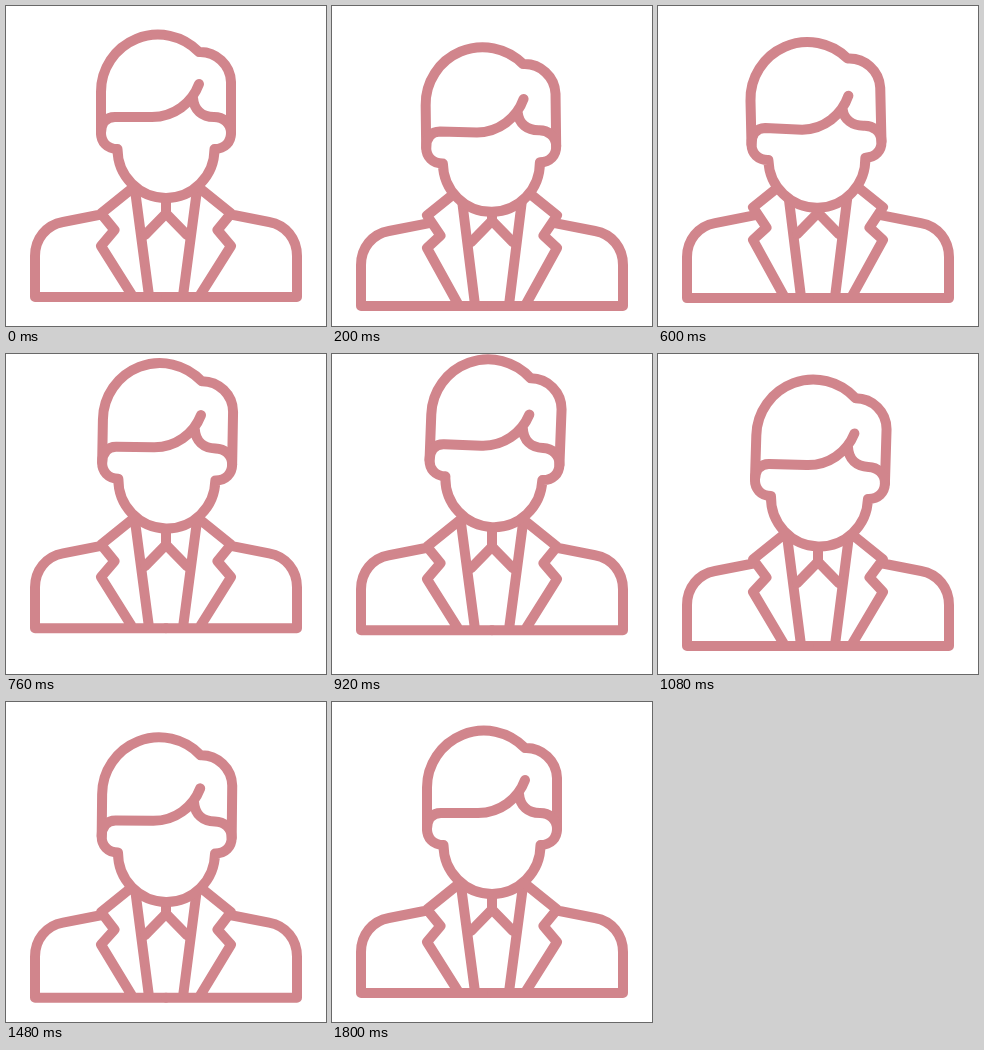
Recreate the animation shown at these times as an HTML page. Size 320 px wide and 320 px high, loop 2.2 s.

```html
<!DOCTYPE html>
<html>
<head>
<meta charset="utf-8">
<style>
html, body { margin: 0; width: 100%; height: 100%; overflow: hidden; background: #fff; }
svg { display: block; width: 100vw; height: 100vh; }
</style>
</head>
<body>
<svg viewBox="0 0 320 320" fill="none" stroke="#d1858c" stroke-width="10" stroke-linecap="round" stroke-linejoin="round">
  <path id="half"/>
  <use href="#half" transform="matrix(-1 0 0 1 320 0)"/>
  <path id="tie"/>
  <g id="head">
    <path id="outline" fill="#fff"/>
    <path id="fringe"/>
  </g>
</svg>
<script>
const LOOP = 2200, STEP = 40, SWING = 420;
const $ = id => document.getElementById(id);
const shape = (id, d) => $(id).setAttribute('d', d);

const ease = (t, start, end) => {
  const p = Math.min(1, Math.max(0, (t - start) / (end - start)));
  return (1 - Math.cos(Math.PI * p)) / 2;
};

// Rest, down, up, down again, rest; lag delays the turning points.
function swing(t, lag, down, up, again) {
  const turn = n => n && n * SWING + lag - (n < 3 ? 20 : 10);
  return [down, up - down, again - up, -again]
    .reduce((sum, step, n) => sum + step * ease(t, turn(n), turn(n + 1)), 0);
}

function draw(t) {
  const body = swing(t, 0, 18, -18.5, 11);
  const collar = swing(t, 0, 4, -18, 6);
  const face = swing(t, 20, 30, -22, 16);
  const tilt = swing(t, 90, -2, 2.2, 0.8);

  const crown = -1.9 * Math.abs(tilt);       // skull stretches as it tilts
  const sag = 2 * Math.max(0, -tilt);        // fringe droops on the way down
  const reach = Math.max(0, body - collar) / 2;
  const notch = (body + collar) / 2;
  const knot = (3 * body + collar) / 4;

  // bar and shoulder, collar, lapel
  shape('half',
    `M160 ${291 + body}H29V${250 + body}C29 ${233 + body} 40 ${219 + body} 57 ${216 + body}` +
    `L${95 + reach} ${208.5 + body - reach * 0.18}` +
    `M131 ${178.5 + collar}L95 ${207.5 + collar}L108.5 ${224 + notch}L95 ${240 + collar}L126.5 ${290 + body}` +
    `M129 ${184 + collar}L143 ${290 + body}`);
  shape('tie',
    `M160 ${186 + knot}V${207.5 + knot}M139 ${229 + knot}L160 ${207.5 + knot}L181 ${229 + knot}`);

  $('head').setAttribute('transform', `translate(0 ${face}) rotate(${tilt} 160 192)`);
  shape('outline',
    `M111.5 143C101 143 95 136 95 127V${86 + crown}A57 57 0 0 1 193 ${46 + crown}` +
    `A31 31 0 0 1 225 ${76 + crown}V127C225 136 219 143 208.5 143A48.5 49 0 0 1 111.5 143Z`);
  shape('fringe',
    `M95 127C95 117 100 111 109 111L146 ${111 + sag}C168 ${111 + sag} 186 ${97 + sag} 193 ${78 + sag}` +
    `M187 ${92 + sag}C188 104 196 111 208 111C217 111 225 117 225 127`);
}

function frame() {
  draw(Math.floor(performance.now() % LOOP / STEP) * STEP);
  requestAnimationFrame(frame);
}
frame();
</script>
</body>
</html>
```
